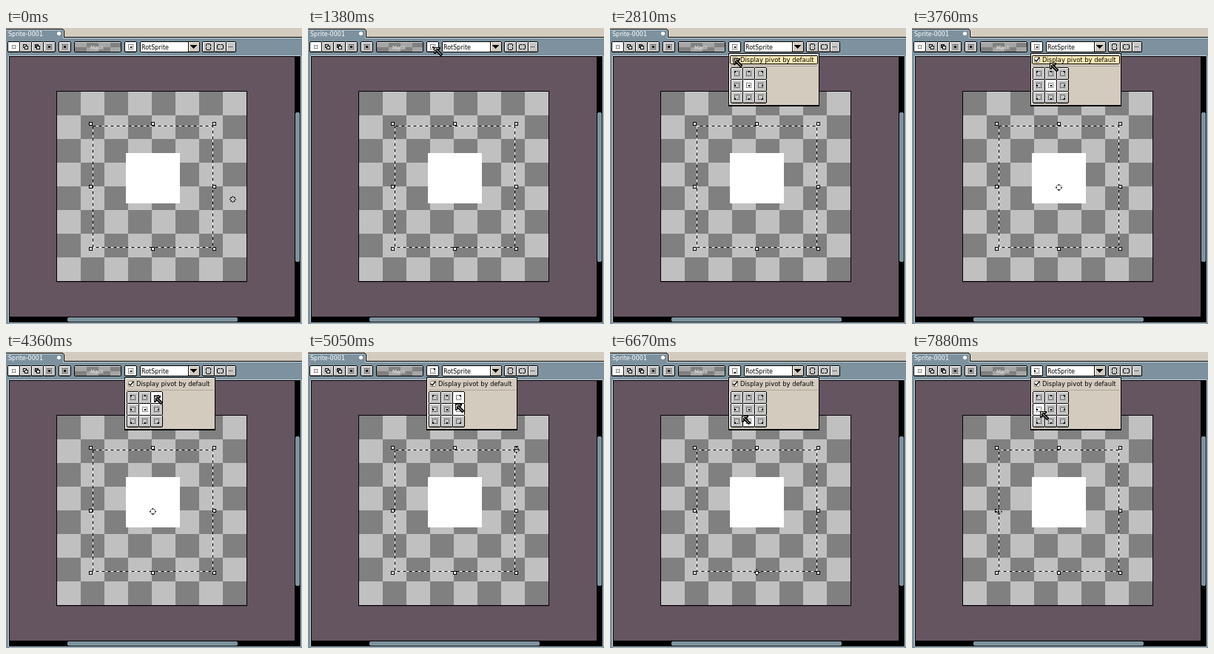
An HTML page with a canvas for the animation above (8000 ms loop, 400x400 px).

```html
<!DOCTYPE html>
<html lang="en">
<head>
<meta charset="utf-8">
<title>Pivot options</title>
<style>
  html, body { margin: 0; width: 100%; height: 100%; overflow: hidden; background: #655561; }
  canvas { display: block; width: 400px; height: 400px; }
</style>
</head>
<body>
<canvas id="stage" width="400" height="400"></canvas>
<script>
const ctx = document.getElementById('stage').getContext('2d');
const LOOP = 8000;
const BLACK = '#000', WHITE = '#fff', FACE = '#d3cbbe', BLUE = '#7d929e', GREY = '#c6c6c6';
const LIGHT = '#c6d5dd', SHADE = '#8d8983';

// Pointer path: time, x, y
const path = [
  [0, 306, 231], [90, 306, 231], [860, 226, 38], [1200, 171, 27], [2220, 171, 27],
  [2780, 168, 42], [3350, 168, 42], [3760, 187, 48], [4060, 192, 52], [4400, 201, 60],
  [4900, 201, 60], [5060, 200, 71], [5480, 186, 91], [6400, 186, 91], [6670, 179, 87],
  [6960, 174, 78], [7200, 174, 78], [7700, 174, 81], [8000, 174, 81]
];
// Chosen pivot cell: start time, column, row
const picks = [[0, 1, 1], [4600, 2, 0], [5540, 1, 2], [6980, 0, 1]];
const OPEN_AT = 2010, CHECK_AT = 3280;
const pivotX = [117, 198, 281], pivotY = [132, 215, 297];

function box(x, y, w, h, color) {
  ctx.fillStyle = color;
  ctx.fillRect(x, y, w, h);
}

function frame(x, y, w, h, fill, line = BLACK) {
  box(x, y, w, h, line);
  box(x + 1, y + 1, w - 2, h - 2, fill);
}

// Frame with its corner pixels left out
function softFrame(x, y, w, h, fill, line = BLACK) {
  box(x + 1, y, w - 2, h, line);
  box(x, y + 1, w, h - 2, line);
  box(x + 1, y + 1, w - 2, h - 2, fill);
}

function label(text, x, y, color, size = 8) {
  ctx.font = size + 'px "DejaVu Sans", sans-serif';
  ctx.fillStyle = color;
  ctx.fillText(text, x, y);
}

function button(x, y, w, h, fill, raised = true) {
  softFrame(x, y, w, h, fill);
  box(x + 1, y + 1, w - 2, 1, WHITE);
  box(x + 1, y + 1, 1, h - 2, WHITE);
  if (raised) box(x + 1, y + h - 2, w - 2, 1, SHADE);
}

function dottedSquare(x, y, size) {
  for (let i = 0; i <= size; i += 2) {
    box(x + i, y, 1, 1, BLACK);
    box(x + i, y + size, 1, 1, BLACK);
    box(x, y + i, 1, 1, BLACK);
    box(x + size, y + i, 1, 1, BLACK);
  }
}

function pivotIcon(x, y, col, row) {
  dottedSquare(x, y, 6);
  box(x + col * 2 + (col > 0), y + row * 2 + (row > 0), 2, 2, BLACK);
}

function pointer(t) {
  let i = 1;
  while (i < path.length - 1 && t >= path[i][0]) i++;
  const [t0, x0, y0] = path[i - 1], [t1, x1, y1] = path[i];
  const k = Math.min(1, (t - t0) / (t1 - t0)), e = k * k * (3 - 2 * k);
  return { x: Math.round(x0 + (x1 - x0) * e), y: Math.round(y0 + (y1 - y0) * e) };
}

function drawTab() {
  box(0, 0, 400, 13, FACE);
  box(0, 12, 400, 1, BLACK);
  box(0, 13, 400, 24, BLUE);
  box(78, 13, 322, 1, LIGHT);
  box(0, 1, 77, 1, BLACK);
  box(78, 3, 1, 10, BLACK);
  box(77, 2, 1, 1, BLACK);
  box(0, 2, 77, 11, BLUE);
  box(0, 2, 76, 1, LIGHT);
  box(77, 3, 1, 11, LIGHT);
  label('Sprite-0001', 3, 11, WHITE);
  box(70, 5, 3, 5, WHITE);
  box(69, 6, 5, 3, WHITE);
}

function drawToolbar(col, row) {
  for (let i = 0; i < 4; i++) {
    const x = 2 + i * 16;
    button(x, 18, 17, 15, i ? GREY : WHITE);
    if (i === 0) dottedSquare(x + 6, 23, 4);
    if (i === 1 || i === 2) {
      frame(x + 5, 22, 5, 5, i === 1 ? WHITE : '#777');
      frame(x + 7, 24, 5, 5, WHITE);
    }
    if (i === 3) {
      dottedSquare(x + 5, 22, 6);
      box(x + 7, 24, 3, 3, BLACK);
    }
  }
  button(71, 18, 17, 15, GREY);
  dottedSquare(76, 22, 6);
  box(78, 24, 3, 3, BLACK);

  softFrame(92, 18, 64, 15, '#a5a5a5');
  for (let i = 0; i < 4; i++) box(93 + i * 16, 19 + (i % 2 ? 0 : 7), i === 3 ? 14 : 16, i % 2 ? 7 : 6, '#808080');
  box(93, 19, 62, 1, '#ddd');
  label('Mask', 114, 29, '#f0f0f0', 7);

  button(160, 18, 17, 15, WHITE);
  pivotIcon(165, 22, col, row);

  softFrame(181, 18, 81, 15, WHITE);
  label('RotSprite', 183, 29, BLACK);
  button(246, 18, 16, 15, FACE);
  for (let i = 0; i < 5; i++) box(249 + i, 23 + i, 9 - i * 2, 1, BLACK);

  for (let i = 0; i < 3; i++) button(265 + i * 16, 18, i === 2 ? 14 : 17, 15, GREY);
  softFrame(270, 21, 7, 9, GREY);
  box(269, 25, 9, 1, GREY);
  softFrame(285, 22, 9, 7, GREY);
  box(289, 21, 1, 9, GREY);
  for (let i = 0; i < 3; i++) box(301 + i * 2, 25, 1, 1, BLACK);
}

function drawEditor() {
  box(0, 37, 400, 363, BLUE);
  softFrame(3, 37, 396, 362, BLACK, LIGHT);
  box(5, 39, 385, 351, '#655561');
  softFrame(391, 114, 6, 202, BLUE, BLUE);
  softFrame(83, 391, 230, 6, BLUE, BLUE);

  box(68, 85, 258, 258, BLACK);
  box(68, 343, 258, 1, '#4d404a');
  for (let r = 0; r < 8; r++)
    for (let c = 0; c < 8; c++)
      box(69 + c * 32, 86 + r * 32, 32, 32, (r + c) % 2 ? '#c0c0c0' : '#808080');
  box(162, 169, 73, 68, WHITE);
}

function drawSelection(t) {
  ctx.lineWidth = 1;
  ctx.strokeStyle = WHITE;
  ctx.strokeRect(117.5, 132.5, 162, 164);
  ctx.strokeStyle = BLACK;
  ctx.setLineDash([4, 4]);
  ctx.lineDashOffset = -(Math.floor(t / LOOP * 104) % 8);
  ctx.strokeRect(117.5, 132.5, 162, 164);
  ctx.setLineDash([]);
  for (const x of [112, 196, 279])
    for (const y of [127, 212, 296])
      if (x !== 196 || y !== 212) frame(x, y, 5, 5, WHITE);
}

function ring(x, y) {
  ctx.lineWidth = 1;
  for (const [color, dash] of [[WHITE, []], [BLACK, [2, 1]]]) {
    ctx.strokeStyle = color;
    ctx.setLineDash(dash);
    ctx.beginPath();
    ctx.arc(x + .5, y + .5, 3.5, 0, Math.PI * 2);
    ctx.stroke();
  }
  ctx.setLineDash([]);
  for (const d of [-4, 3]) {
    box(x + d, y, 2, 1, BLACK);
    box(x, y + d, 1, 2, BLACK);
  }
}

function drawPopup(p, col, row, checked) {
  frame(160, 34, 123, 72, FACE);
  box(161, 35, 121, 1, WHITE);
  box(161, 35, 1, 69, WHITE);
  box(161, 104, 121, 1, BLACK);
  if (p.y >= 36 && p.y < 50) softFrame(162, 37, 119, 12, '#ffebb6');
  softFrame(165, 39, 8, 8, checked ? WHITE : FACE, '#8d8078');
  if (checked) {
    ctx.strokeStyle = BLACK;
    ctx.lineWidth = 1.3;
    ctx.beginPath();
    ctx.moveTo(166, 43);
    ctx.lineTo(168, 45);
    ctx.lineTo(172.5, 39.5);
    ctx.stroke();
  }
  label('Display pivot by default', 176, 46, BLACK, 8.4);
  for (let x = 163; x < 280; x += 2) box(x, 51, 1, 1, '#8d8078');
  for (let r = 0; r < 3; r++)
    for (let c = 0; c < 3; c++) {
      const x = 163 + c * 16, y = 53 + r * 16;
      const hot = p.x >= x && p.x < x + 16 && p.y >= y && p.y < y + 16;
      button(x, y, 17, 17, hot || (c === col && r === row) ? WHITE : GREY, r === 2);
      pivotIcon(x + 5, y + 5, c, r);
    }
}

function crosshair(x, y) {
  for (const d of [-4, 3]) {
    box(x + d, y, 2, 1, BLACK);
    box(x, y + d, 1, 2, BLACK);
  }
  for (const i of [-2, 2])
    for (const j of [-2, 2]) {
      box(x + i, y + j, 1, 1, BLACK);
      box(x + i * 1.5, y + j, 1, 1, BLACK);
      box(x + i, y + j * 1.5, 1, 1, BLACK);
    }
}

function arrow(x, y) {
  ctx.save();
  ctx.translate(x - 1, y - 1);
  ctx.fillStyle = BLACK;
  ctx.fill(new Path2D('M0 0H9V2L7 4L12 9V10L10 12H9L4 7L2 9H0Z'));
  ctx.strokeStyle = FACE;
  ctx.lineWidth = 1;
  ctx.stroke(new Path2D('M1.5 7V1.5H7M2 2L10 10'));
  ctx.restore();
}

function draw(t) {
  const p = pointer(t);
  const [, col, row] = picks.filter(s => t >= s[0]).pop();
  const checked = t >= CHECK_AT;
  drawEditor();
  drawSelection(t);
  if (checked) ring(pivotX[col], pivotY[row]);
  drawTab();
  drawToolbar(col, row);
  if (t >= OPEN_AT) drawPopup(p, col, row, checked);
  if (t < OPEN_AT && p.y > 39) crosshair(p.x, p.y);
  else arrow(p.x, p.y);
}

function tick() {
  draw(performance.now() % LOOP);
  requestAnimationFrame(tick);
}
tick();
</script>
</body>
</html>
```
